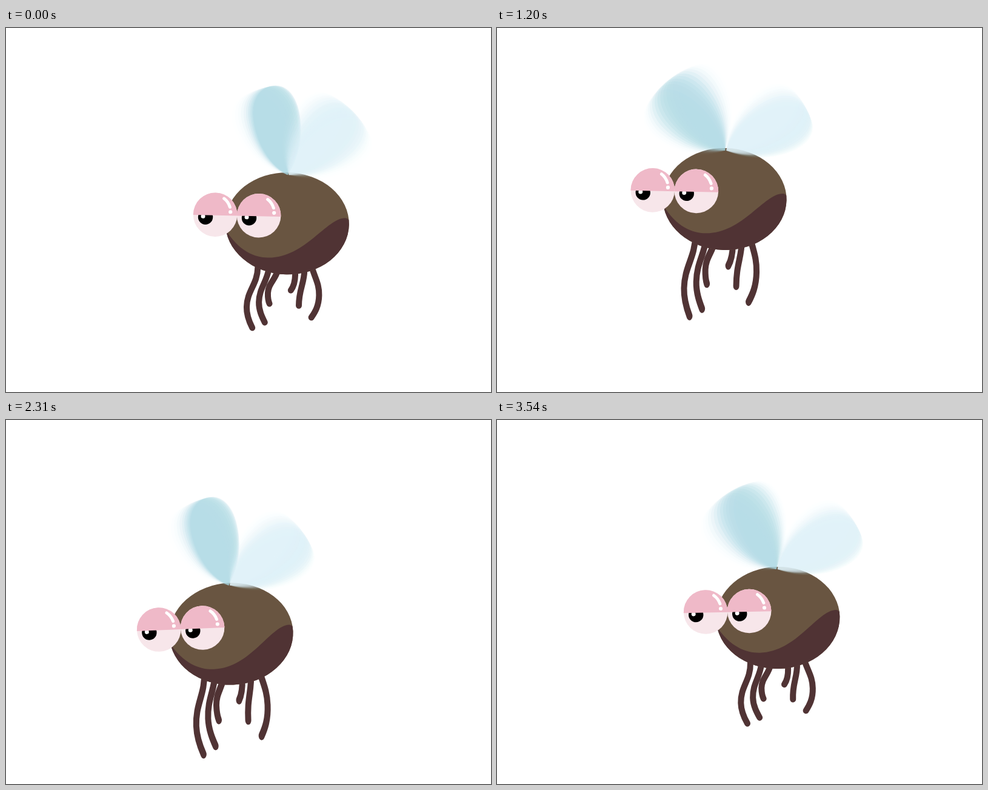
Recreate the animation shown at these times as an HTML page with a canvas. Size 800x600 px, loop 3600 ms.

```html
<!DOCTYPE html>
<html lang="en">
<head>
<meta charset="utf-8">
<title>Sleepy fly</title>
<style>
  html, body { margin: 0; width: 100%; height: 100%; overflow: hidden; background: #fff; }
  canvas { display: block; width: 800px; height: 600px; }
</style>
</head>
<body>
<canvas id="stage" width="800" height="600"></canvas>
<script>
const ctx = document.getElementById('stage').getContext('2d');
const LOOP = 3600, STEP = 30, TAU = Math.PI * 2, RAD = Math.PI / 180;

// Flight path of the body centre, one knot every 300 ms
const route = [
  [463.8, 324.2], [454, 302], [433.5, 280], [404, 271], [378, 280.5], [356, 298],
  [347, 320], [355, 339.5], [376.5, 355.5], [404.5, 368.5], [429, 359.5], [449.5, 340]
];

const legs = new Path2D(
  'M-47 55V75C-47 102-64 112-64 138C-64 150-59 162-54 171' +
  'M-28 55L-29 78C-32 98-44 108-44 130C-44 143-38 154-33.6 162' +
  'M-11 55L-14 79C-18 94-29 100-29.5 115C-29.5 124-28 129-26.5 132' +
  'M15 55V85C15 98 12 105 8.3 110' +
  'M30 55V78C30 100 21.5 108 22 134' +
  'M38 55L43 75C49 92 55 100 55 117C55 134 49 144 43 152.5');
const belly = new Path2D(
  'M-104 8C-80 48-52 57-31 57C30 57 65-11 96-11Q100-11 104-5V100H-104Z');
const wing = new Path2D(
  'M0 0C-30-25-42-70-37-108C-32-138-14-149 2-149C20-149 35-136 38-106C41-68 26-25 0 0Z');
const body = new Path2D();
body.ellipse(0, 0, 102, 84, 0, 0, TAU);

const leftWing = { mid: -40, swing: 28, beats: 53, phase: 135 };
const rightWing = { mid: 38, swing: 27, beats: 52, phase: 240 };

function along(t) {
  const n = route.length, u = t / LOOP * n, i = Math.floor(u), s = u - i;
  const at = k => route[(i + k + n) % n];
  return [0, 1].map(c => {
    const [a, b, d, e] = [at(-1)[c], at(0)[c], at(1)[c], at(2)[c]];
    return b + s * ((d - a) + s * ((2 * a - 5 * b + 4 * d - e) + s * (3 * (b - d) + e - a))) / 2;
  });
}

// Linear back and forth: 0 to 1 to 0 over one period
function pingPong(t, period) {
  const p = (t / period) % 1;
  return p < 0.5 ? 2 * p : 2 - 2 * p;
}

function group(draw) {
  ctx.save();
  draw();
  ctx.restore();
}

function disc(x, y, r, color) {
  ctx.fillStyle = color;
  ctx.beginPath();
  ctx.arc(x, y, r, 0, TAU);
  ctx.fill();
}

function eye(x, y) {
  group(() => {
    ctx.translate(x, y);
    disc(0, 0, 36.3, '#f7e6ea');
    group(() => {
      ctx.beginPath();
      ctx.arc(0, 0, 36.3, 0, TAU);
      ctx.clip();
      disc(-16, 4.3, 12.2, '#000');
      disc(-20, 3, 3.5, '#fff');
      ctx.fillStyle = '#efb9c8';
      ctx.fillRect(-40, -40, 80, 41);
    });
    ctx.strokeStyle = '#fff';
    ctx.lineWidth = 5;
    ctx.lineCap = 'round';
    ctx.beginPath();
    ctx.moveTo(14, -27);
    ctx.quadraticCurveTo(21, -22, 24, -13);
    ctx.stroke();
    disc(25, -5, 3.1, '#fff');
  });
}

// A beating wing, smeared over the time of one step and fading to both sides
function flap(w, t, x, color, alpha, lag = 0) {
  const ghosts = 24;
  ctx.fillStyle = color;
  for (let i = 0; i < ghosts; i++) {
    const u = 2 * (i + 0.5) / ghosts - 1;
    const turn = TAU * w.beats * (t + u * STEP / 2) / LOOP - w.phase * RAD;
    ctx.globalAlpha = alpha * Math.exp(-8 * u * u);
    group(() => {
      ctx.translate(x, -80);
      ctx.rotate((w.mid + w.swing * Math.cos(turn) + lag) * RAD);
      ctx.fill(wing);
    });
  }
  ctx.globalAlpha = 1;
}

function drawLegs(t) {
  group(() => {
    ctx.translate(0, 111);
    ctx.scale(1, 1 + 0.525 * pingPong(t, 900));
    ctx.translate(0, -111);
    ctx.strokeStyle = '#503334';
    ctx.lineWidth = 10;
    ctx.lineCap = 'round';
    ctx.stroke(legs);
  });
}

function drawBody() {
  ctx.fillStyle = '#695541';
  ctx.fill(body);
  group(() => {
    ctx.clip(body);
    ctx.fillStyle = '#503334';
    ctx.fill(belly);
  });
}

function draw(t) {
  ctx.fillStyle = '#fff';
  ctx.fillRect(0, 0, 800, 600);
  group(() => {
    ctx.translate(...along(t));
    ctx.rotate((24 * pingPong(t + 300, 1200) - 12) * RAD);
    drawLegs(t);
    drawBody();
    flap(leftWing, t, -1, '#a8d3df', 0.22);
    flap(rightWing, t, 1, '#a8d3df', 0.08, 4);
    flap(rightWing, t, 1, '#deeef6', 0.22);
    eye(-119, -12);
    eye(-47, -12);
  });
}

function tick() {
  const step = Math.min(Math.floor(performance.now() % LOOP / STEP), LOOP / STEP - 2);
  draw((step + 1) * STEP);
  requestAnimationFrame(tick);
}
tick();
</script>
</body>
</html>
```
